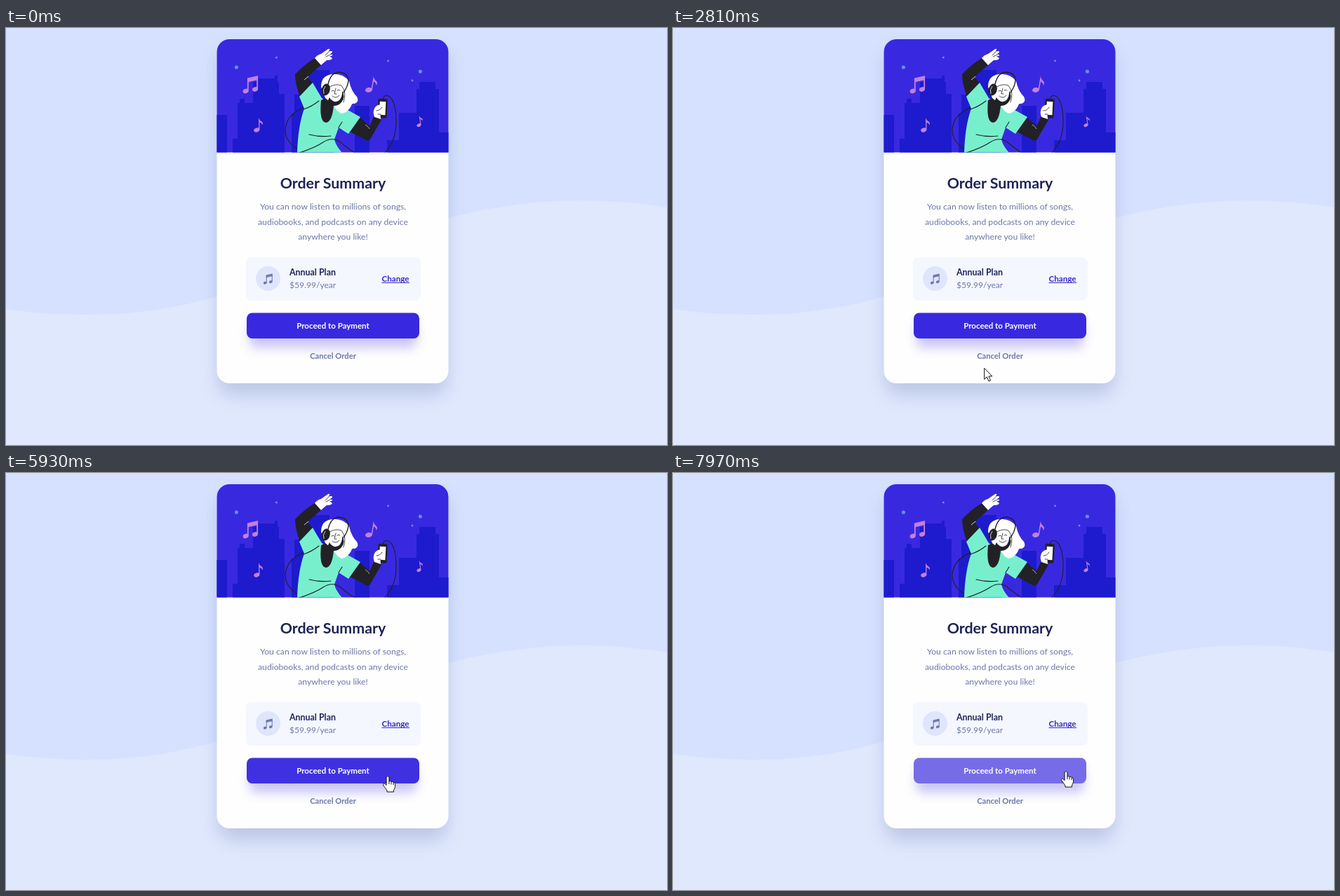
Recreate the animation shown at these times as an HTML page. Size 942 by 595 pixels, loop 8 s.

```html
<!DOCTYPE html>
<html lang="en">
<head>
<meta charset="utf-8">
<title>Order Summary</title>
<style>
html, body { margin: 0; width: 100%; height: 100%; overflow: hidden; background: #d6e1ff; }
svg { display: block; }
text { font-family: Lato, "Open Sans", sans-serif; }
.mid { text-anchor: middle; }
.bold { font-weight: 700; }
.navy { fill: #1f2456; }
.soft { fill: #6d77a8; }
.dark { fill: #222126; }
.white { fill: #fff; }
.ink { fill: none; stroke: #202024; stroke-width: 1.1; stroke-linecap: round; stroke-linejoin: round; }
.thin { stroke-width: .8; }
.thick { stroke-width: 1.4; }
</style>
</head>
<body>
<svg width="942" height="595" viewBox="0 0 942 595">
  <defs>
    <clipPath id="cardClip"><rect x="300.5" y="16" width="330" height="491" rx="18"/></clipPath>
    <clipPath id="heroClip"><rect x="300" y="16" width="331" height="161.5"/></clipPath>
    <filter id="blurL" x="-30%" y="-30%" width="160%" height="160%"><feGaussianBlur stdDeviation="13"/></filter>
    <filter id="blurS" x="-30%" y="-100%" width="160%" height="300%"><feGaussianBlur stdDeviation="8"/></filter>
    <g id="pair">
      <path d="M 7 3.4 L 22 0 V 6 L 7 9.4 Z"/>
      <path d="M 7.8 4 V 22 M 21.2 2 V 19" fill="none" stroke="currentColor" stroke-width="1.8"/>
      <ellipse cx="4.6" cy="22" rx="4.1" ry="3.2" transform="rotate(-18 4.6 22)"/>
      <ellipse cx="18" cy="19.5" rx="4.1" ry="3.2" transform="rotate(-18 18 19.5)"/>
    </g>
    <g id="note">
      <path d="M 8 18 V 0 Q 9 4 13 6 Q 15 8 13.5 11 Q 12.5 7.5 9.4 7 V 18 Z"/>
      <ellipse cx="5" cy="18.5" rx="4.4" ry="3.1" transform="rotate(-18 5 18.5)"/>
    </g>
  </defs>

  <rect width="942" height="595" fill="#d6e1ff"/>
  <path fill="#e0e8fe" d="M 0 401 C 40 407 80 409 120 409 C 380 409 540 246 820 246 C 862 246 905 250 942 256 V 595 H 0 Z"/>

  <rect x="302" y="32" width="327" height="492" rx="20" fill="#3d558c" opacity=".22" filter="url(#blurL)"/>
  <rect x="300.5" y="16" width="330" height="491" rx="18" fill="#fefefe"/>

  <g clip-path="url(#cardClip)"><g clip-path="url(#heroClip)">
    <rect x="300" y="16" width="331" height="162" fill="#3829e0"/>
    <path id="city" fill="#1d1bcd"/>
    <g fill="#6c8be6">
      <circle cx="328.4" cy="56" r="2.6"/><circle cx="385.3" cy="42" r="1.5"/>
      <circle cx="590.4" cy="62" r="2.6"/><circle cx="544.6" cy="47" r="1.4"/><circle cx="579" cy="75" r="1.4"/>
    </g>
    <g fill="#c47fe2" color="#c47fe2">
      <use href="#pair" x="337" y="68"/>
      <use href="#note" transform="translate(352.5 128) scale(.95)"/>
      <use href="#note" transform="translate(515 67) rotate(10) scale(1.12)"/>
      <use href="#note" transform="translate(583 126) rotate(-8) scale(.72)"/>
    </g>

    <!-- listener -->
    <path class="ink" d="M 450 101 C 435 112 398 115 398 147 Q 399 166 425 178"/>
    <path class="dark" d="M 440 43 L 449 53 Q 438 62 430 70 L 438 80 L 419 98 Q 412 80 412 66 Q 425 52 440 43 Z"/>
    <path class="white" d="M 440 43 Q 444 38 449 37 L 459 30 Q 463 29 460 33 L 464 33 Q 467 34 462 37
      L 465 38 Q 466 40 461 40 L 465 43 Q 464 46 457 46 Q 452 50 449 53 Z"/>
    <path class="ink thin" d="M 455 39 L 461 33 M 456 41 L 464 37"/>
    <path d="M 425 74 L 431 69" stroke="#fff" stroke-width=".8"/>
    <path class="dark" d="M 505 128 L 490 148 L 513 160 Q 518 162 520 157 L 535 131 L 525 125 L 518 140 Z"/>
    <path fill="#77efcd" d="M 437 78 L 418 98 L 425 115 Q 416 140 415 178 H 479 Q 470 168 468 159
      L 474 142 L 488 151 L 505 127 L 487 117 Q 477 111 467 111 L 450 100 Z"/>
    <path class="dark" d="M 449 103 Q 446 134 456 135 Q 465 134 467 110 L 460 98 Z"/>
    <path class="white" d="M 449 84 Q 449 68 464 66 Q 480 64 489 76 Q 492 90 500 98 Q 504 105 497 108
      Q 493 107 492 111 Q 487 121 478 122 Q 471 119 467 110 L 455 100 Z"/>
    <path class="dark" d="M 478 88 Q 485 98 478 106 Q 474 111 467 111 L 458 105 L 461 99 Q 468 108 475 102 Q 479 97 478 88 Z"/>
    <path class="white" d="M 461 84 Q 471 78 478 84 Q 481 95 476 102 Q 470 109 462 101 Z"/>
    <path class="ink thin" d="M 461 84 Q 470 79 478 82 Q 486 92 481 106 M 470 86 L 468 94 L 471 94
      M 464 90 Q 466 88 468 90 M 472 89 Q 474 87 476 89 M 465 97 Q 470 102 475 96"/>
    <ellipse class="dark" cx="455.7" cy="88" rx="6" ry="8.7" transform="rotate(16 455.7 88)"/>
    <path d="M 455 83 Q 451 88 453 94" fill="none" stroke="#fff" stroke-width=".8"/>
    <path class="ink thick" d="M 459 80 Q 463 63 475 63 Q 487 64 488 75 Q 487 84 481 92"/>
    <path class="ink" d="M 418 178 Q 440 171 452 163 Q 466 154 478 164 Q 490 174 497 178
      M 432 152 Q 448 156 463 154 M 474 142 L 479 134 M 424 116 Q 436 112 446 104"/>
    <path d="M 512 138 Q 516 140 518 144" fill="none" stroke="#fff" stroke-width=".6"/>
    <path class="ink" d="M 537 102 Q 538 95 545 97 Q 555 102 556 130 Q 557 160 540 178"/>
    <g transform="rotate(3 536 115)">
      <rect class="dark" x="529.8" y="101" width="13.4" height="27.5" rx="2"/>
      <rect class="white" x="532.3" y="105" width="8.6" height="19"/>
    </g>
    <path class="white" d="M 526 113 Q 531 107 536 111 Q 538 114 533 117 L 534 130 L 525 127 Q 522 119 526 113 Z"/>
    <path class="ink thin" d="M 528 118 Q 533 118 536 113 M 530 123 H 534"/>
  </g></g>

  <text class="mid bold navy" x="466" y="228.5" font-size="21.4">Order Summary</text>
  <g class="mid soft" font-size="12.2">
    <text x="466" y="259">You can now listen to millions of songs,</text>
    <text x="466" y="280.7">audiobooks, and podcasts on any device</text>
    <text x="466" y="302">anywhere you like!</text>
  </g>

  <rect x="341.5" y="327" width="249.5" height="62" rx="8" fill="#f5f7ff"/>
  <circle cx="373.5" cy="357.5" r="17.5" fill="#dfe6fb"/>
  <use href="#pair" fill="#7079ae" color="#7079ae" transform="translate(366.5 350.5) scale(.6)"/>
  <text class="bold navy" x="404" y="352.5" font-size="12.4">Annual Plan</text>
  <text class="soft" x="404" y="371" font-size="12.1">$59.99/year</text>
  <text class="mid bold" x="555" y="362" font-size="11.7" fill="#3829c8">Change</text>
  <path d="M 535.5 363.5 H 575" stroke="#3829c8"/>

  <rect x="347" y="420" width="238" height="36" rx="8" fill="#3829e0" opacity=".27" filter="url(#blurS)"/>
  <rect id="pay" x="343" y="406.5" width="246" height="36.5" rx="8" fill="#3829e0"/>
  <text class="mid bold" x="466" y="428.7" font-size="11.5" fill="#fff">Proceed to Payment</text>
  <text id="cancel" class="mid bold" x="466" y="472.3" font-size="11.2">Cancel Order</text>

  <g id="cursor" stroke="#111" fill="#fff" stroke-linejoin="round">
    <path id="arrow" d="M .5 .5 V 16.5 L 4.2 13 L 6.8 19.2 L 9.4 18.1 L 6.8 12.1 H 11.7 Z"/>
    <g id="hand">
      <path d="M -1.9 2 Q 0 -1 1.9 2 V 8 Q 4.2 6.7 5 8.7 Q 7.2 7.5 8.1 9.5 Q 10.5 8.9 10.5 11.5 V 15.5
        Q 10 18.5 8.5 20.5 V 23 H -1 V 21 Q -3 18 -6 14 Q -7.5 11 -4.5 11.3 L -1.9 13.5 Z"/>
      <path fill="none" d="M 1.9 8 V 12 M 5 9 V 12.5 M 8.1 10 V 13"/>
    </g>
  </g>
</svg>
<script>
const LOOP = 8000;
const el = id => document.getElementById(id);
const pay = el("pay"), cancel = el("cancel"), cursor = el("cursor"), arrow = el("arrow"), hand = el("hand");

// buildings: left, right, top
const city = [
  [300, 315, 124], [323, 330, 158], [330, 352, 107], [333, 340, 101], [352, 389, 77],
  [358, 383, 72], [383, 387, 68], [389, 397, 94], [407, 411, 122], [411, 424, 95],
  [424, 468, 75], [432, 461, 60], [497, 518, 111], [543, 560, 160], [560, 585, 121],
  [585, 617, 87], [589, 612, 77], [617, 631, 149]
];
el("city").setAttribute("d", city.map(([a, b, y]) => `M ${a} 178 V ${y} H ${b} V 178 Z`).join(" "));

// pointer stops: time, x, y
const stops = [
  [190, 868, 509], [260, 845, 470], [330, 795, 385], [410, 757, 343], [600, 760, 344],
  [700, 715, 310], [900, 600, 170], [1050, 520, 75], [1190, 460, 41], [1260, 410, 52],
  [1390, 293, 140], [1460, 280, 175], [1600, 275, 270], [1800, 310, 400], [1950, 355, 480],
  [2080, 385, 505], [2210, 389, 505], [2500, 410, 500], [2950, 458, 478], [3160, 462, 474],
  [3760, 462, 475], [3960, 463, 491], [4230, 463, 491], [4660, 462, 474], [5120, 462, 474],
  [5300, 475, 483], [5500, 505, 478], [5860, 545, 443], [5930, 544, 432], [6540, 544, 432],
  [6810, 553, 453], [7000, 554, 456], [7300, 558, 431], [7510, 560, 426], [8000, 560, 425]
];

const overCancel = [[2940, 3780], [4440, 5160]];
const overPay = [[5895, 6690], [7180, 9000]];

const clamp = v => Math.max(0, Math.min(1, v));
const inside = (t, spans) => spans.some(([a, b]) => t >= a && t < b);
const hover = (t, spans, d) =>
  Math.max(...spans.map(([a, b]) => Math.min(clamp((t - a) / d), 1 - clamp((t - b) / d))));
const mix = (a, b, k) => `rgb(${a.map((v, i) => Math.round(v + (b[i] - v) * k))})`;

function place(t) {
  const i = Math.max(1, stops.findIndex(s => s[0] >= t));
  const [t0, x0, y0] = stops[i - 1], [t1, x1, y1] = stops[i];
  const k = clamp((t - t0) / (t1 - t0));
  return [x0 + (x1 - x0) * k, y0 + (y1 - y0) * k];
}

function draw(t) {
  const over = inside(t, overCancel) || inside(t, overPay);
  cursor.style.display = t < 190 ? "none" : "";
  arrow.style.display = over ? "none" : "";
  hand.style.display = over ? "" : "none";
  cursor.setAttribute("transform", `translate(${place(t)})`);
  cancel.setAttribute("fill", mix([109, 119, 168], [28, 30, 48], hover(t, overCancel, 190)));
  pay.setAttribute("fill", mix([56, 41, 224], [118, 108, 232], hover(t, overPay, 320)));
}

const start = performance.now();
function tick(now) {
  draw(Math.max(0, now - start) % LOOP);
  requestAnimationFrame(tick);
}
draw(0);
requestAnimationFrame(tick);
</script>
</body>
</html>
```
